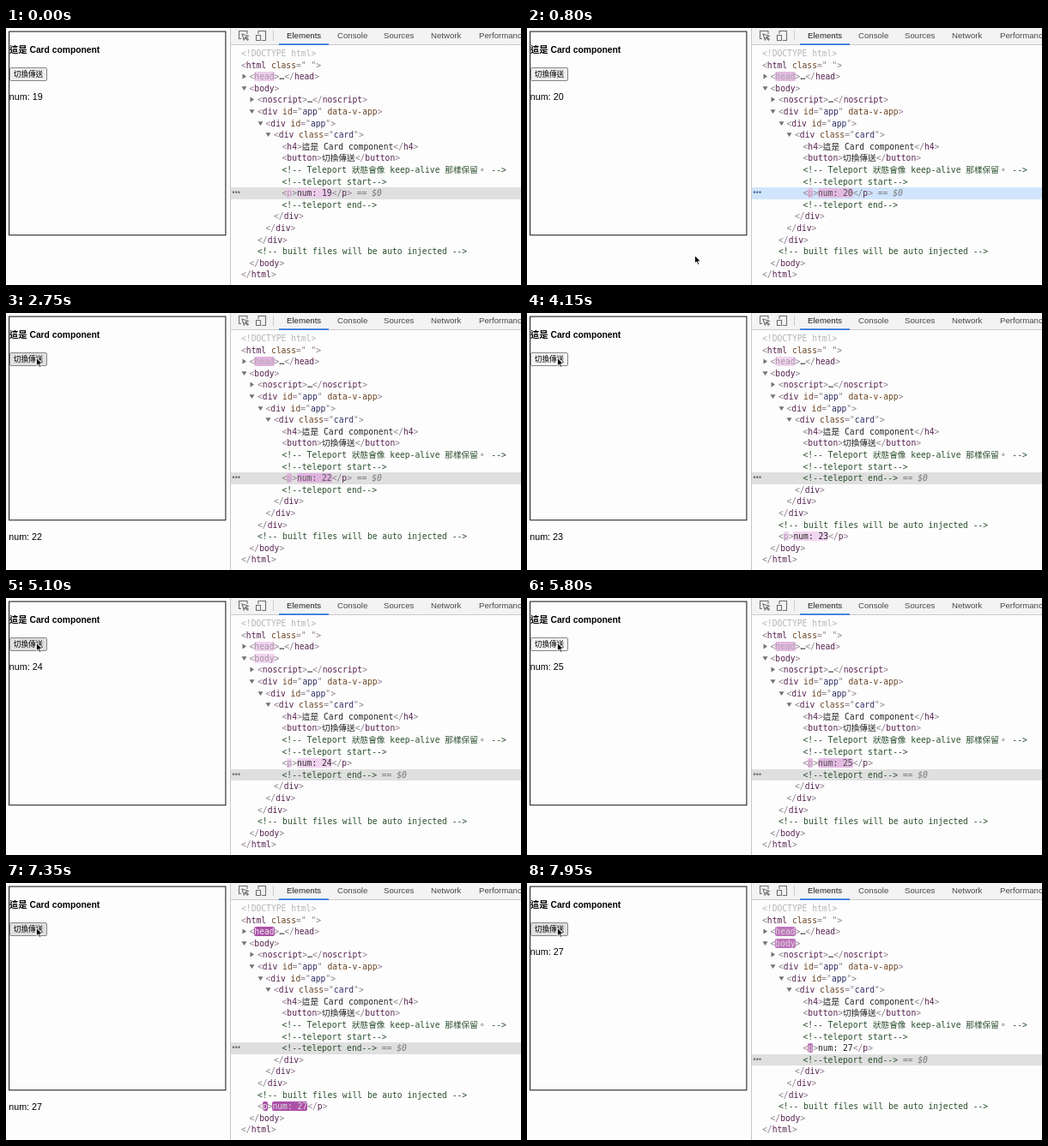
An HTML page for the animation above (8 s loop, 600 by 300 pixels).

```html
<!DOCTYPE html>
<html lang="zh-Hant">
<head>
<meta charset="utf-8">
<style>
  html, body { margin: 0; width: 100%; height: 100%; overflow: hidden; background: #fdfdfd; }
  #stage { position: relative; width: 600px; height: 300px; overflow: hidden; background: #fdfdfd;
    font: 10.3px "Liberation Sans", "Noto Sans CJK TC", "Noto Sans CJK", sans-serif; color: #000; }
  #stage div, #stage svg { position: absolute; white-space: pre; box-sizing: border-box; }
  #card { left: 0; top: 0; fill: none; stroke: #111; }
  #title { left: 4px; top: 18px; line-height: 16px; font-weight: bold; }
  #button { left: 4px; top: 46px; width: 44px; height: 16px; border: 1px solid #858585; border-radius: 2px;
    font-size: 8.6px; line-height: 14px; text-align: center; }
  #num { font-size: 10.75px; line-height: 16px; }
  #tools { left: 261px; top: 0; width: 339px; height: 300px; border-left: 1px solid #c8c8c8; }
  #bar { left: 0; top: 0; width: 339px; height: 20px; background: #f3f3f3; border-bottom: 1px solid #cbcbcb; }
  #icons { left: 0; top: 0; fill: none; stroke: #6e6e6e; stroke-width: 1.1; }
  .tab { top: 2px; font-size: 9.65px; line-height: 14px; color: #484848; }
  .tab.on { color: #222; }
  #rows { left: -262px; top: 0; width: 600px; height: 300px;
    font: 9.66px "DejaVu Sans Mono", "Noto Sans CJK TC", "Noto Sans CJK", monospace; }
  .row { line-height: 13.6px; height: 13.6px; color: #222; }
  .arrow { left: -9.6px; top: 3px; width: 7px; height: 7px; fill: #727272; }
  #selected { left: 262px; width: 338px; height: 13.6px; }
  #dots { left: 1.5px; top: 0; font: bold 8.5px/13px "Liberation Sans", sans-serif; letter-spacing: .3px; }
  .tag { color: #8f7f8d; }
  .name { color: #55204f; }
  .attr { color: #6b4423; }
  .val { color: #2b2b62; }
  .note { color: #2a4f2c; }
  .doctype { color: #b5b5b5; }
  .ref { color: #777; font-style: italic; }
  .flash { border-radius: 2px; }
</style>
</head>
<body>
<div id="stage">
  <svg id="card" width="262" height="250"><rect x="3.6" y="4.1" width="252.3" height="237.7"/></svg>
  <div id="title">這是 Card component</div>
  <div id="button">切換傳送</div>
  <div id="num"></div>
  <div id="tools">
    <div id="bar">
      <svg id="icons" width="130" height="21">
        <path d="M12 12.5H9.5V3.5H19V7M13 7l2.2 7 1.3-2.7 2.8 3 1-1-2.8-2.9 2.6-1.1z"/>
        <path d="M32 7V3.5h8.5v11H36M29.5 8.5h5v6h-5z"/>
        <path d="M49.5 3v12" stroke="#ccc" stroke-width="1"/>
        <path d="M56 19.1h58" stroke="#2f74dc" stroke-width="1.7"/>
      </svg>
    </div>
    <div id="rows"><div id="selected"><div id="dots">•••</div></div></div>
  </div>
  <svg id="cursor" width="12" height="16" viewBox="-2 -2 12 16" style="left:-2px;top:-2px">
    <path d="M0 0V9.2L2.1 7.3 3.6 10.8 5.2 10.1 3.7 6.8H6.6Z" fill="#000" stroke="#fff" stroke-width=".8"/>
  </svg>
</div>
<script>
const LOOP = 8000, TOP = 23, LINE = 13.6, P_ROW = 12, P_AWAY = 17;
const $ = id => document.getElementById(id);
const span = (cls, text, id = '') => `<span class="${cls}"${id && ` id="${id}"`}>${text}</span>`;
const tag = inner => span('tag', `&lt;${inner}&gt;`);
const open = (name, attrs = '', id = '') => tag(span(id ? 'name flash' : 'name', name, id) + attrs);
const close = name => tag('/' + span('name', name));
const attr = (name, value) => ' ' + span('attr', name) + (value ? `="${span('val', value)}"` : '');
const note = text => span('note', `&lt;!--${text}--&gt;`);
const ref = id => span('ref', ' == $0', id);

// depth, arrow, markup
const rows = [
  [0, '', span('doctype', '&lt;!DOCTYPE html&gt;')],
  [0, '', open('html', attr('class', ' '))],
  [1, 'right', open('head', '', 'head') + '…' + close('head')],
  [1, 'down', open('body', '', 'body')],
  [2, 'right', open('noscript') + '…' + close('noscript')],
  [2, 'down', open('div', attr('id', 'app') + attr('data-v-app'))],
  [3, 'down', open('div', attr('id', 'app'))],
  [4, 'down', open('div', attr('class', 'card'), 'cardTag')],
  [5, '', open('h4') + '這是 Card component' + close('h4')],
  [5, '', open('button') + '切換傳送' + close('button')],
  [5, '', note(' Teleport 狀態會像 keep-alive 那樣保留。 ')],
  [5, '', note('teleport start')],
  [5, '', open('p', '', 'pTag') + span('flash', '', 'pText') + close('p') + ref('pRef')],
  [5, '', note('teleport end') + ref('endRef')],
  [4, '', close('div')],
  [3, '', close('div')],
  [2, '', close('div')],
  [2, '', note(' built files will be auto injected ')],
  [1, '', close('body')],
  [0, '', close('html')]
].map(([depth, arrow, markup]) => {
  const el = document.createElement('div');
  const shape = arrow === 'right' ? 'M1.5 .5L6 3.5 1.5 6.5z' : 'M.5 1.2H6.5L3.5 6z';
  el.className = 'row';
  el.innerHTML = (arrow && `<svg class="arrow"><path d="${shape}"/></svg>`) + markup;
  $('rows').append(el);
  return { el, depth };
});

[['Elements', 65], ['Console', 124], ['Sources', 178], ['Network', 233], ['Performance', 289]].forEach(([text, x], i) => {
  const el = document.createElement('div');
  el.className = i ? 'tab' : 'tab on';
  el.style.left = x + 'px';
  el.textContent = text;
  $('bar').append(el);
});

const clicks = [2700, 4200, 5900, 7750];
const updates = [2800, 4250, 5950, 7800];
const countBefore = (times, t) => times.filter(at => at <= t).length;
const lastOf = (times, t) => Math.max(-1e5, ...times.filter(at => at <= t));
const clamp = v => Math.min(1, Math.max(0, v));
const mix = (a, b, k) => a.map((v, i) => v + (b[i] - v) * k);
const rgba = c => `rgba(${c.join()})`;

// cubic-bezier(0, 0, .2, 1)
function easeOut(x) {
  let lo = 0, hi = 1;
  for (let i = 0; i < 20; i++) {
    const s = (lo + hi) / 2;
    if (.6 * (1 - s) * s * s + s ** 3 < x) lo = s; else hi = s;
  }
  return 3 * (1 - lo) * lo * lo + lo ** 3;
}

const STRONG = [158, 54, 153, 1], PALE = [245, 219, 244, 1], CLEAR = [245, 219, 244, 0];
const WHITE = [255, 255, 255, 1], BRACKET = [160, 142, 158, 1], NAME = [85, 32, 79, 1], TEXT = [34, 34, 34, 1];

function flash(id, age, inherited = BRACKET, final = NAME) {
  const k = age / 1400, early = k < .8;
  const e = easeOut(clamp(early ? k / .8 : (k - .8) / .2));
  $(id).style.background = rgba(early ? mix(STRONG, PALE, e) : mix(PALE, CLEAR, e));
  $(id).style.color = rgba(early ? mix(WHITE, inherited, e) : mix(inherited, final, e));
}

function moveCursor(t) {
  const enter = 1 - (1 - clamp((t - 250) / 450)) ** 2;
  const s = clamp((t - 900) / 700), go = s * s * (3 - 2 * s);
  const [x, y] = mix(mix([218, 303], [195.5, 265.5], enter), [35.5, 52.5], go);
  $('cursor').style.transform = `translate(${x}px,${y}px)`;
}

function render(t) {
  const ticks = Math.floor((t + 700) / 1000);
  const label = 'num: ' + (19 + ticks);
  const ticked = ticks * 1000 - 700;
  const updated = lastOf(updates, t);
  const away = countBefore(updates, t) % 2 === 1;
  const moved = updated > 0;

  const below = countBefore(clicks, t) % 2 === 1;
  $('num').textContent = label;
  $('num').style.left = (below ? 3.2 : 3.8) + 'px';
  $('num').style.top = (below ? 253 : 72) + 'px';
  const pressed = clicks.some(at => t >= at - 100 && t < at);
  $('button').style.background = pressed ? '#f5f5f5' : t >= 1550 ? '#e0e0e0' : '#efefef';

  rows.forEach(({ el, depth }, i) => {
    let line = i;
    if (away && i === P_ROW) { line = P_AWAY; depth = 2; }
    else if (away && i > P_ROW && i <= P_AWAY) line--;
    el.style.left = 274 + 9.5 * depth + 'px';
    el.style.top = TOP + LINE * line + 'px';
  });
  const focused = t >= 400 && t < 2600;
  $('selected').style.top = TOP + LINE * (moved && !away ? P_ROW + 1 : P_ROW) + 'px';
  $('selected').style.background = focused ? '#d0e5fc' : '#dfdfdf';
  $('dots').style.color = focused ? '#4a6f96' : '#6e6e6e';
  $('pRef').style.display = moved ? 'none' : '';
  $('endRef').style.display = moved ? '' : 'none';

  $('pText').textContent = label;
  const latest = t - Math.max(ticked, updated);
  flash('pText', ticked > updated ? t - ticked : 1400, TEXT, TEXT);
  flash('pTag', latest);
  flash('head', latest);
  flash('body', t - lastOf(updates.filter((_, i) => i % 2), t));
  flash('cardTag', t - lastOf(updates.filter((_, i) => i % 2 === 0), t));
  moveCursor(t);
}

const start = performance.now();
function frame() {
  render((performance.now() - start) % LOOP);
  requestAnimationFrame(frame);
}
frame();
</script>
</body>
</html>
```
